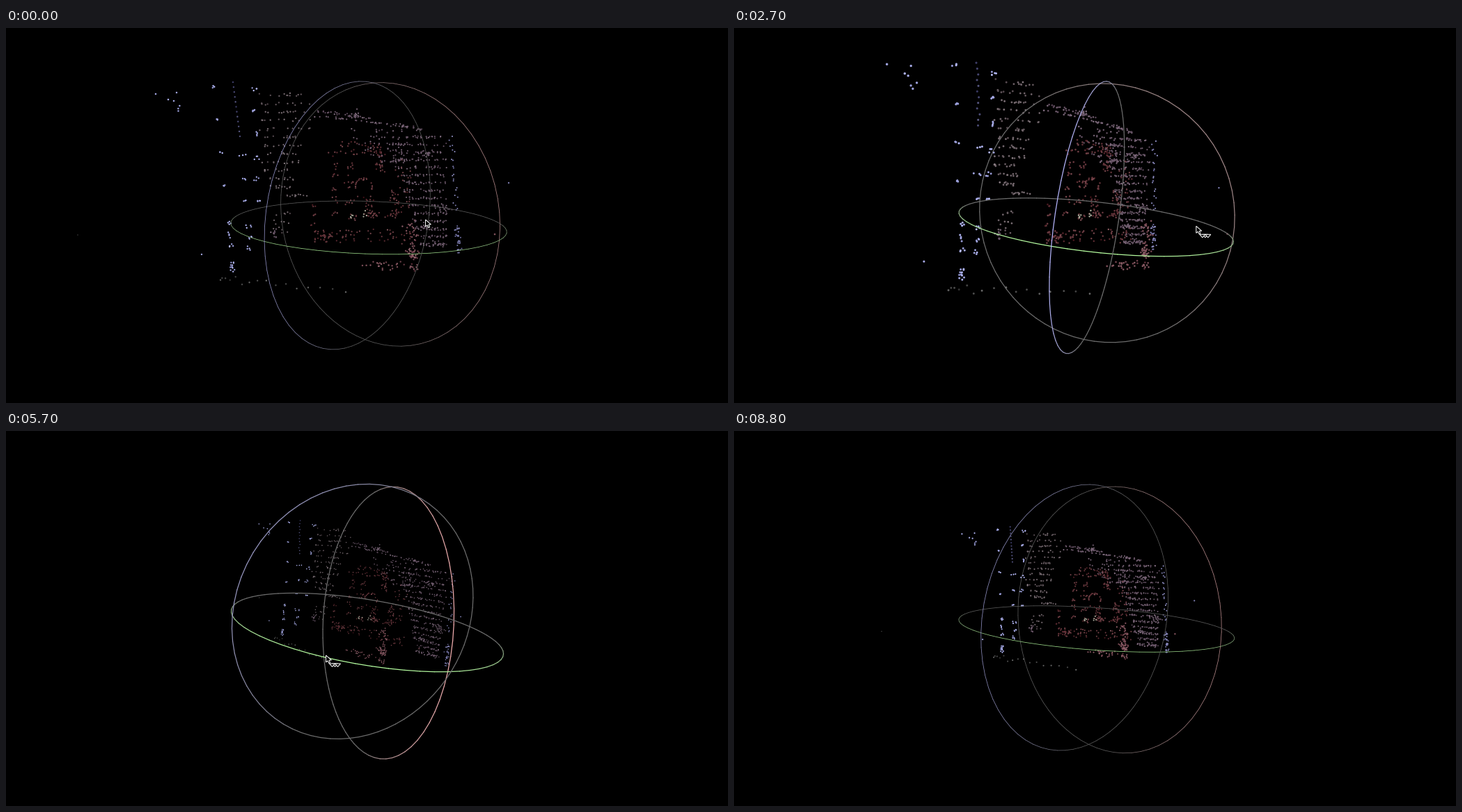
These frames come from a looping animation (1037 by 540 pixels, 9.4 s). A matplotlib script:

```python
import numpy as np
import matplotlib.pyplot as plt
from matplotlib.animation import FuncAnimation
from matplotlib.collections import LineCollection
from matplotlib.patches import Polygon

W, H, DPI = 1037, 540, 64
PX = 72 / DPI
CX, CY, FOCAL = 521.5, 275, 562
STEP, LOOP = 100, 9400
rng = np.random.default_rng(4)

# yaw, pitch, roll, pointer x, pointer y
OPENING = np.array([54.2, 10.4, 1.9, 602, 275])
# start, end, then the state reached
MOVES = [(500, 1300, 29, 12, 0, 490, 290),
         (1700, 2200, 35, 13.5, -.6, 508, 288),
         (2200, 3000, 91.5, 8.7, 8.6, 716, 283),
         (4100, 4200, 91.5, 8.7, 8.6, 957, 356),
         (4300, 4900, 64, 10.85, 11.1, 619, 342),
         (4900, 5700, 28, 13, 9.44, 459, 322),
         (5800, 6200, 51, 10, 6, 690, 325),
         (6300, 6900, 48.3, 8.35, 3.9, 706, 328)]
DRAGS = [(600, 1500), (1800, 3300), (4400, 8400)]
HOVERS = [(0, 400), (3500, 4400)]

BLUE, NAVY, HAZE = (164, 168, 228), (72, 72, 114), (130, 130, 182)
GREY, PLUM, RED = (110, 98, 104), (110, 90, 108), (102, 54, 60)
ROSE, DIM, WHITE = (128, 82, 92), (82, 82, 82), (165, 165, 150)

# depth of each surface along x, as seen from the opening view
WALL = ([215, 330, 420, 503, 620], [.112, .06, -.045, -.063, -.155])
FRONT = ([438, 514, 600], [.033, -.02, -.05])
LOW = ([330, 500, 585], [.085, .125, .078])


def state(t):
    now = OPENING
    for start, end, *goal in MOVES:
        s = np.clip((t - start) / (end - start), 0, 1)
        now = now + (np.array(goal) - now) * (1 - (1 - s) ** 1.4)
    return now


def camera_distance(t):
    zoom_out = .2125 * np.clip((t - 3800) // 200, 0, 2)
    dip = .7 * np.sin(np.pi * np.clip((t - 8300) / 500, 0, 1))
    return 1 + zoom_out - dip


def rotation(yaw, pitch, roll):
    y, p, r = np.radians([yaw, pitch, roll])
    ry = [[np.cos(y), 0, np.sin(y)], [0, 1, 0], [-np.sin(y), 0, np.cos(y)]]
    rx = [[1, 0, 0], [0, np.cos(p), -np.sin(p)], [0, np.sin(p), np.cos(p)]]
    rz = [[np.cos(r), np.sin(r), 0], [-np.sin(r), np.cos(r), 0], [0, 0, 1]]
    return np.array(rz) @ rx @ ry


def project(p, distance):
    depth = np.maximum(distance - p[:, 2], .04)
    xy = np.c_[CX + FOCAL * p[:, 0] / depth, CY - FOCAL * p[:, 1] / depth]
    return xy, depth


def lift(x, y, z):
    """World points seen at (x, y) in the opening view, z toward the viewer."""
    yaw, pitch, roll = OPENING[:3]
    c, s = np.cos(np.radians(roll)), np.sin(np.radians(roll))
    u0, v0 = (x - CX) / FOCAL, (CY - y) / FOCAL
    u, v = u0 * c - v0 * s, v0 * c + u0 * s
    c, s = np.cos(np.radians(pitch)), np.sin(np.radians(pitch))
    b = (v * (1 - z * c) + z * s) / (c + v * s)
    return np.c_[u * (1 - b * s - z * c), b, z] @ rotation(yaw, 0, 0)


cloud, tints = [], []


def add(x, y, surface, color):
    x, y = np.broadcast_arrays(np.atleast_1d(x).astype(float), y)
    if isinstance(surface, tuple):
        z = np.interp(x, *surface) + rng.normal(0, .005, len(x))
    else:
        z = np.full(len(x), surface)
    cloud.append(lift(x, y, z))
    tints.append(np.clip(color + rng.normal(0, 12, (len(x), 1)), 0, 255))


def row(x0, x1, y, n, surface, color, wobble=1.0):
    """Dots at random places of a fine grid on one scan line."""
    x = np.round(rng.uniform(x0, x1, n) / 4) * 4 + rng.normal(0, .5, n)
    add(x, y + rng.normal(0, wobble, n), surface, color)


def blob(x, y, rx, ry, n, surface, color):
    add(x + rng.normal(0, rx / 2, n), y + rng.normal(0, ry / 2, n), surface, color)


def column(x0, y0, x1, y1, clumps, n, surface, color, spread=4):
    for x, y in zip(np.linspace(x0, x1, clumps), np.linspace(y0, y1, clumps)):
        blob(x, y, spread, spread, n, surface, color)


# far left corner
for x, y in [(215, 95), (233, 103), (245, 93), (241, 105), (281, 326)]:
    add(x, y, WALL, BLUE)
blob(247, 115, 3, 4, 3, WALL, BLUE)
column(297, 86, 313, 226, 4, 3, WALL, BLUE, 3)
column(356, 88, 363, 249, 6, 4, WALL, BLUE)
column(341, 184, 344, 250, 3, 3, WALL, BLUE)
column(349, 287, 348, 318, 3, 4, WALL, BLUE)
column(319, 280, 323, 313, 3, 4, .076, BLUE)
column(325, 338, 325, 348, 2, 6, .076, BLUE, 5)
add(np.linspace(326, 336, 12), np.linspace(78, 156, 12), WALL, NAVY)

# left part of the wall
for y in np.arange(97, 242, 12):
    row(363 + max(y - 190, 0) * .4, rng.uniform(412, 438), y, 11, WALL, GREY)
for y in np.arange(267, 300, 12):
    row(384, 414, y, 5, WALL, GREY, 2)
blob(386, 297, 5, 8, 10, WALL, PLUM)

# upper band and right part of the wall
s = rng.uniform(0, 1, 80)
add(443 + 157 * s, 120 + 27 * s ** 1.3 + rng.choice([0, 8], 80) * (1 - s)
    + rng.normal(0, 1.2, 80), WALL, PLUM)
for y in np.arange(148, 200, 9):
    row(488 + (y - 148), 572, y, 11, WALL, PLUM, 1.5)
for y in np.arange(157, 316, 11):
    row(548 + (y - 157) * .3, 633, y, 26, WALL, PLUM, 1.2)
for x, y in [(503, 125), (607, 182), (628, 259), (600, 287), (563, 190), (618, 311)]:
    blob(x, y, 13, 5, 15, WALL, PLUM)
column(640, 158, 646, 262, 11, 2, WALL, HAZE, 4)
column(648, 288, 650, 318, 4, 8, WALL, HAZE, 5)

# objects in the middle
for y in (168, 178):
    row(480, 540, y, 14, FRONT, RED, 2)
for y in (293, 299, 305):
    row(440, 590, y, 24, FRONT, RED, 2)
row(515, 570, 269, 24, FRONT, RED, 2.5)
column(472, 180, 471, 264, 6, 4, FRONT, RED, 6)
column(441, 256, 441, 282, 3, 3, FRONT, RED)
column(495, 200, 497, 275, 4, 7, FRONT, RED, 8)
column(537, 176, 537, 198, 2, 15, FRONT, RED, 9)
column(520, 248, 525, 268, 3, 8, FRONT, RED, 7)
column(556, 240, 558, 264, 3, 8, FRONT, RED, 8)
column(568, 200, 576, 250, 4, 5, FRONT, RED, 12)
blob(458, 299, 12, 7, 14, FRONT, RED)
angle = rng.uniform(-.4, np.pi + .4, 20)
add(514 + 12 * np.cos(angle), 228 - 11 * np.sin(angle) + rng.normal(0, 1, 20), FRONT, RED)
column(497, 272, 517, 268, 2, 4, FRONT, WHITE, 6)

# lower edge
column(582, 285, 584, 342, 5, 9, LOW, ROSE, 10)
blob(585, 326, 9, 8, 24, LOW, ROSE)
blob(540, 342, 32, 8, 24, LOW, ROSE)
s = np.linspace(0, 1, 16) ** 1.6
add(308 + 180 * s, 361 + 14 * s + rng.normal(0, 4, 16), LOW, DIM)

# strays
add(722, 223, .042, HAZE)
add(702, 297, .18, ROSE)
add(103, 298, -1.43, DIM)

cloud, tints = np.vstack(cloud), np.vstack(tints) / 255

fig = plt.figure(figsize=(W / DPI, H / DPI), dpi=DPI, facecolor="black")
ax = fig.add_axes([0, 0, 1, 1])
ax.set(xlim=(0, W), ylim=(H, 0))
ax.axis("off")

dots = ax.scatter(*np.zeros((2, len(cloud))), c=tints, linewidths=0, zorder=1)

turn = np.linspace(0, 2 * np.pi, 73)
cos, sin, zero = np.cos(turn), np.sin(turn), 0 * turn
RINGS = [(np.c_[zero, cos, sin], (255, 180, 182)),
         (np.c_[cos, zero, sin], (182, 255, 160)),
         (np.c_[cos, sin, zero], (182, 182, 255))]
rings = [LineCollection([], zorder=2, capstyle="round") for _ in RINGS]
for ring in rings:
    ax.add_collection(ring)


def outline(points):
    return ax.add_patch(Polygon(points, closed=True, fc="black", ec="white",
                                lw=PX, zorder=3))


ARROW = np.array([(.5, 1), (.5, 11), (3, 8.9), (4.8, 12.5), (6.6, 11.7),
                  (5, 8.1), (8.4, 7.9)])
TRIANGLE = np.array([(0, 0), (8, 0), (4, 4.5)])
BADGE = [TRIANGLE + (dx, 13) for dx in (9.5, 5.5, 13.5)]
arrow = outline(ARROW)
badge = [outline(p) for p in BADGE]


def within(spans, t):
    return any(start <= t < end for start, end in spans)


def draw(frame):
    t = frame * STEP
    yaw, pitch, roll, *tip = state(t)
    distance = camera_distance(t)
    turned = rotation(yaw, pitch, roll)
    dragging = within(DRAGS, t)

    xy, depth = project(cloud @ turned.T, distance)
    size = np.interp(yaw, [30, 52, 91], [1.6, 2.2, 2.7]) * (distance / depth) ** .8
    dots.set_offsets(xy)
    dots.set_sizes((np.maximum(size, 1.4) * PX) ** 2)

    base, gain, width = (108, 1, 1.25) if dragging else (104, .84, .8)
    for ring, (shape, color) in zip(rings, RINGS):
        p = shape @ turned.T
        xy, _ = project(p, 3)
        near = np.clip((p[1:, 2] + p[:-1, 2]) / 2, 0, 1)[:, None] ** .85
        ring.set_segments(np.stack([xy[:-1], xy[1:]], 1))
        ring.set_color((base + (np.array(color) - base) * near) * gain / 255)
        ring.set_linewidth(width * PX)

    arrow.set_xy(ARROW + tip)
    arrow.set_visible(dragging or within(HOVERS, t))
    arrow.set_alpha(.5 if within([(300, 400)], t) else 1)
    for patch, points in zip(badge, BADGE):
        patch.set_xy(points + tip)
        patch.set_visible(dragging)
    return [dots, *rings, arrow, *badge]


anim = FuncAnimation(fig, draw, frames=LOOP // STEP, interval=STEP,
                     repeat=True, repeat_delay=0, blit=False)
plt.show()
```
